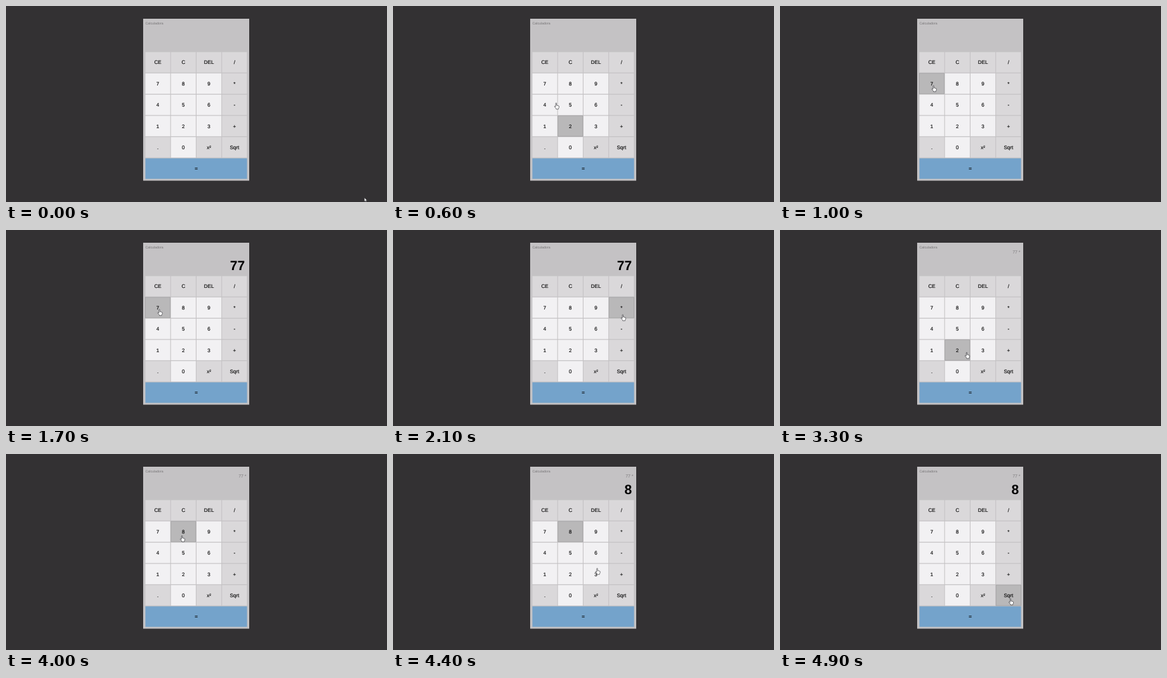
Recreate the animation shown at these times as an HTML page. Size 600 by 308 pixels, loop 5000 ms.

```html
<!DOCTYPE html>
<html lang="pt">
<head>
<meta charset="utf-8">
<title>Calculadora</title>
<style>
  html, body { margin: 0; width: 100%; height: 100%; overflow: hidden; background: #333133; }
  svg { display: block; width: 600px; height: 308px; }
  text {
    font-family: "Liberation Sans", Arial, sans-serif;
    font-size: 8px;
    fill: #080808;
    text-rendering: geometricPrecision;
  }
  .key text { text-anchor: middle; stroke: #080808; stroke-width: .15; }
  .num rect { fill: #f2f1f3; }
  .op rect { fill: #dad8da; }
  .eq rect { fill: #74a3cb; }
  .hover rect { fill: #b9b8b9; stroke: #a3a2a4; stroke-width: .8; }
  #title { font-size: 5.3px; fill: #757375; }
  #previous { font-size: 7px; fill: #7d7b7d; text-anchor: end; }
  #current { font-size: 21px; font-weight: bold; fill: #000; text-anchor: end; }
  #cursor path { fill: #fff; stroke: #2a2a2e; stroke-linejoin: round; }
</style>
</head>
<body>
<svg viewBox="0 0 600 308">
  <rect x="216" y="20" width="167" height="254.5" fill="#c4c2c4"/>
  <text id="title" x="219.5" y="28.7">Calculadora</text>
  <text id="previous" x="378.6" y="37.4"></text>
  <text id="current" x="376.2" y="63.2"></text>
  <g id="keys"></g>
  <g id="cursor">
    <path id="arrow" stroke-width=".6" d="M0 0v6.4l1.5-1.3 1 2.2 1-.4-1-2.2h2z"/>
    <path id="hand" stroke-width="1.4" transform="scale(.46) translate(-6.5 -1)"
      d="M5 13V2.5a1.5 1.5 0 0 1 3 0V9q3-.6 3 1 3-.8 3 .8 2.5-.5 2.5 1.8v3.5l-2 4V22h-8v-1.9L1 14q-.8-2 1-2.2 1 0 3 2.2z"/>
  </g>
</svg>
<script>
const LOOP = 5000, STEP = 100;
const PITCH_X = 40.25, PITCH_Y = 33.4;
const LABELS = ['CE C DEL /', '7 8 9 *', '4 5 6 -', '1 2 3 +', '. 0 x² Sqrt', '='];

const HOME = [564.3, 301];

// Pointer moves, timed in steps
const MOVES = [
  { at: 0, lasts: 5, to: [270, 176] },
  { at: 5, lasts: 7, to: [241.5, 124.7] },
  { at: 17, lasts: 5, to: [362, 133] },
  { at: 24, lasts: 5, to: [361, 138.7] },
  { at: 29, lasts: 4, to: [294, 192.3] },
  { at: 35, lasts: 5, to: [277, 128.3] },
  { at: 43, lasts: 6, to: [363, 227.4] }
];

const PRESSES = [
  { at: 15, label: '7' }, { at: 17, label: '7' },
  { at: 24, label: '*' }, { at: 43, label: '8' }
];

const $ = id => document.getElementById(id);
const isDigit = label => /^\d$/.test(label);
const easeOut = k => 1 - (1 - k) ** 4;

function make(parent, name, attrs) {
  const el = document.createElementNS('http://www.w3.org/2000/svg', name);
  for (const k in attrs) el.setAttribute(k, attrs[k]);
  return parent.appendChild(el);
}

function makeKey(label, row, col) {
  const x = 219.5 + col * PITCH_X, y = 72.4 + row * PITCH_Y;
  const wide = label === '=';
  const width = wide ? 160.1 : 39.2;
  const kind = wide ? 'eq' : isDigit(label) ? 'num' : 'op';
  const key = make($('keys'), 'g', { class: 'key ' + kind });
  make(key, 'rect', { x, y, width, height: 32.2 });
  make(key, 'text', { x: x + width / 2, y: y + 19 }).textContent = label;
  return key;
}

const keys = LABELS.map((row, r) => row.split(' ').map((label, c) => makeKey(label, r, c)));

function pointerAt(step) {
  return MOVES.reduce((from, { at, lasts, to }) => {
    const k = easeOut(Math.min(Math.max((step - at) / lasts, 0), 1));
    return from.map((v, i) => v + (to[i] - v) * k);
  }, HOME);
}

function keyAt([x, y]) {
  const row = keys[Math.floor((y - 72) / PITCH_Y)];
  return row && row[Math.floor((x - 219) / PITCH_X)];
}

// Digits extend the current number; an operator moves it to the line above
function displayAt(step) {
  let previous = '', current = '';
  for (const { at, label } of PRESSES) {
    if (at > step) break;
    if (isDigit(label)) current += label;
    else [previous, current] = [`${current} ${label}`, ''];
  }
  return { previous, current };
}

function draw(step) {
  const pointer = pointerAt(step);
  const overKey = keyAt(pointer);
  $('cursor').setAttribute('transform', `translate(${pointer})`);
  $('hand').style.display = overKey ? '' : 'none';
  $('arrow').style.display = overKey ? 'none' : '';

  // The highlight trails the pointer by one step
  const lit = keyAt(pointerAt(step - 1));
  keys.flat().forEach(key => key.classList.toggle('hover', key === lit));

  const { previous, current } = displayAt(step);
  $('previous').textContent = previous;
  $('current').textContent = current;
}

let shown = -1;

function tick() {
  const step = Math.floor(performance.now() % LOOP / STEP);
  if (step !== shown) draw(shown = step);
  requestAnimationFrame(tick);
}
tick();
</script>
</body>
</html>
```
